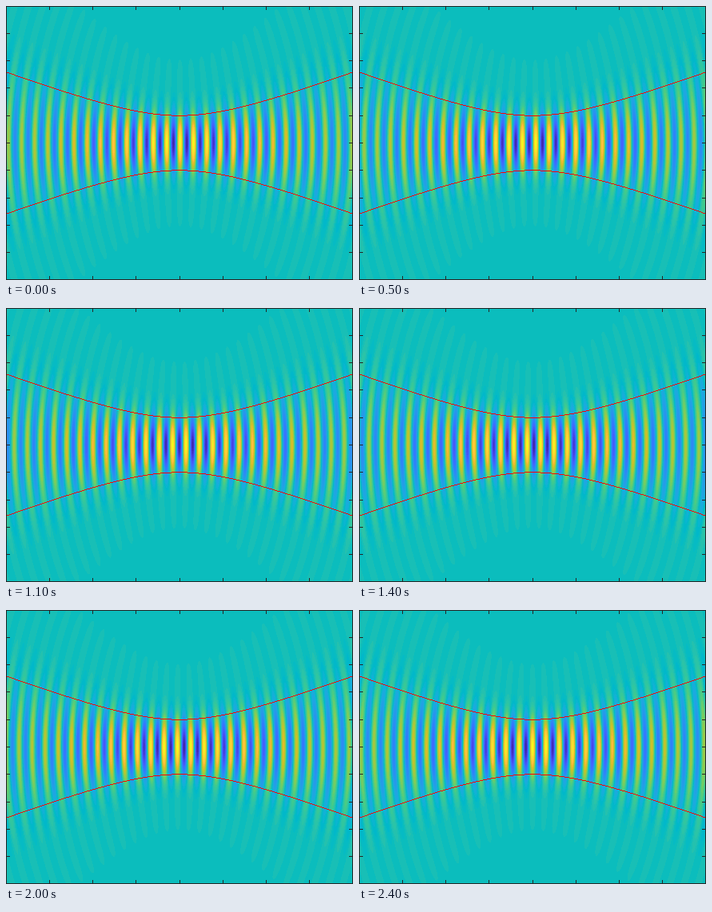
Write an HTML page with a canvas that moves like this. It is 434 px wide and 343 px high and loops after 2500 ms.

```html
<!DOCTYPE html>
<html lang="en">
<head>
<meta charset="utf-8">
<title>Gaussian beam</title>
<style>
html, body { margin: 0; width: 100%; height: 100%; overflow: hidden; }
canvas { display: block; width: 434px; height: 343px; }
</style>
</head>
<body>
<canvas id="stage" width="434" height="343"></canvas>
<script>
const W = 434, H = 343, STEPS = 25, STEP_MS = 100;
const ctx = document.getElementById('stage').getContext('2d');

// Beam in millimetres; the plot spans 800 x 400 mm.
const LAMBDA = 30, WAIST = 40;
const K = 2 * Math.PI / LAMBDA;
const ZR = Math.PI * WAIST * WAIST / LAMBDA;
const MM_X = 800 / W, MM_Y = 400 / H;
const CX = 216.6, CY = (H - 1) / 2;
const BIAS = 1e-4; // keeps zero just inside the lower middle colour

// Every second entry of the 64-level colour map.
const KEYS = [
  [64,42,180], [67,50,203], [70,60,222], [71,71,235],
  [72,82,244], [70,94,251], [66,105,254], [56,117,254],
  [47,129,250], [45,140,243], [39,151,235], [35,160,229],
  [28,169,223], [18,177,214], [1,184,202], [11,189,189],
  [36,193,174], [49,198,159], [63,202,142], [87,204,122],
  [114,205,100], [143,203,78], [171,199,57], [197,194,42],
  [220,189,41], [240,186,48], [254,190,60], [254,201,52],
  [250,214,45], [245,227,39], [246,239,32], [249,251,21]
];

const pack = (r, g, b) => (255 << 24 | b << 16 | g << 8 | r) >>> 0;

const palette = Array.from({ length: 64 }, (_, i) => {
  const p = (i - 1) / 2;
  const a = Math.max(0, Math.floor(p));
  const from = KEYS[a], to = KEYS[Math.min(a + 1, KEYS.length - 1)];
  return pack(...from.map((c, n) => Math.round(c + (to[n] - c) * (p - a))));
});
const RED = pack(255, 0, 0), INK = pack(38, 38, 38);

const widthAt = z => WAIST * Math.sqrt(1 + (z / ZR) ** 2);

// The field is re * cos(wt) + im * sin(wt) at each pixel.
const re = new Float32Array(W * H), im = new Float32Array(W * H);
for (let x = 0; x < W; x++) {
  const z = (x - CX) * MM_X, w = widthAt(z);
  const bend = K * z / (2 * (z * z + ZR * ZR));
  const axial = K * z - Math.atan(z / ZR);
  for (let y = 0; y < H; y++) {
    const r = (y - CY) * MM_Y;
    const amp = WAIST / w * Math.exp(-r * r / (w * w));
    const phase = axial + bend * r * r;
    re[y * W + x] = amp * Math.cos(phase);
    im[y * W + x] = amp * Math.sin(phase);
  }
}

const image = ctx.createImageData(W, H);
const px = new Uint32Array(image.data.buffer);
const dot = (x, y, c) => { px[y * W + x] = c; };

function drawEdges() {
  for (let x = 0; x < W; x++) {
    const d = widthAt((x - CX) * MM_X) / MM_Y;
    dot(x, Math.round(CY - d), RED);
    dot(x, Math.round(CY + d), RED);
  }
}

function drawAxes() {
  for (let x = 0; x < W; x++) { dot(x, 0, INK); dot(x, H - 1, INK); }
  for (let y = 0; y < H; y++) { dot(0, y, INK); dot(W - 1, y, INK); }
  for (let n = 1; n < 8; n++) {
    const x = Math.floor(n * W / 8);
    for (let i = 0; i < 5; i++) { dot(x, i, INK); dot(x, H - 1 - i, INK); }
  }
  for (let n = 1; n < 10; n++) {
    const y = Math.floor(n * H / 10);
    for (let i = 0; i < 5; i++) { dot(i, y, INK); dot(W - 1 - i, y, INK); }
  }
}

function draw(step) {
  const wt = 2 * Math.PI * (step + 1) / STEPS;
  const c = Math.cos(wt), s = Math.sin(wt);
  for (let i = 0; i < px.length; i++) {
    const level = Math.floor((re[i] * c + im[i] * s - BIAS + 1) * 32);
    px[i] = palette[Math.max(0, Math.min(63, level))];
  }
  drawEdges();
  drawAxes();
  ctx.putImageData(image, 0, 0);
}

let shown = 0;
const start = performance.now();
function tick() {
  const t = Math.max(0, performance.now() - start);
  const step = Math.floor(t / STEP_MS) % STEPS;
  if (step !== shown) draw(shown = step);
  requestAnimationFrame(tick);
}
draw(0);
requestAnimationFrame(tick);
</script>
</body>
</html>
```
